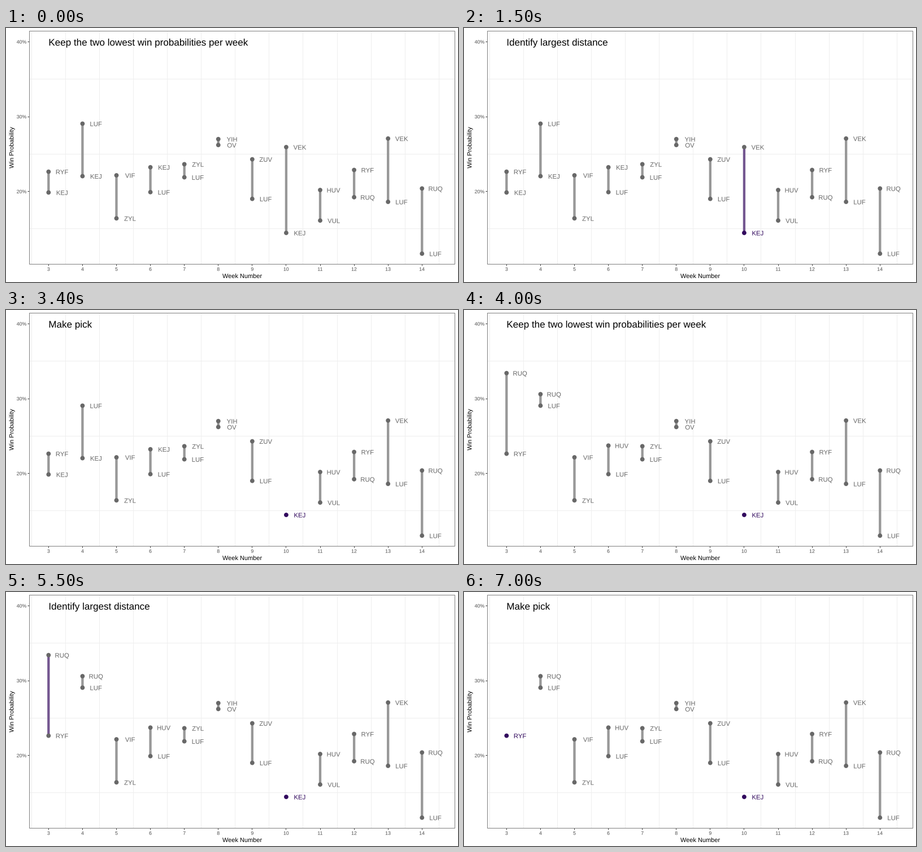
Write a matplotlib script that moves like this. It is 800 px wide and 450 px high and loops after 8000 ms.

```python
import matplotlib.pyplot as plt
from matplotlib.animation import FuncAnimation
from matplotlib.patches import Circle, PathPatch, Rectangle
from matplotlib.textpath import TextPath
from matplotlib.transforms import Affine2D

plt.rcParams["font.family"] = "Liberation Sans"

W, H = 800, 450
PX = 0.72  # points per pixel at 100 dpi
STEP_MS = 500

GREY, BAR_GREY = "#686868", "#989898"
PICK, BAR_PICK = "#320A5E", "#745790"
LEFT, TOP, RIGHT, BOTTOM = 41, 5, 794, 418

KEEP = "Keep the two lowest win probabilities per week"
FIND = "Identify largest distance"
MAKE = "Make pick"

# week: [(team, y), (team, y)], in stage pixels
START = {
    3: [("RYF", 254.6), ("KEJ", 291.4)],
    4: [("LUF", 169.5), ("KEJ", 262.5)],
    5: [("VIF", 261.0), ("ZYL", 337.2)],
    6: [("KEJ", 246.7), ("LUF", 290.8)],
    7: [("ZYL", 241.3), ("LUF", 264.5)],
    8: [("YIH", 196.8), ("OV", 207.3)],
    9: [("ZUV", 232.6), ("LUF", 302.7)],
    10: [("VEK", 211.0), ("KEJ", 363.0)],
    11: [("HUV", 287.0), ("VUL", 341.1)],
    12: [("RYF", 251.5), ("RUQ", 299.8)],
    13: [("VEK", 195.8), ("LUF", 308.0)],
    14: [("RUQ", 284.3), ("LUF", 399.8)],
}
PICKED = {**START, 10: START[10][1:]}
SECOND = {
    **PICKED,
    3: [("RUQ", 111.8), ("RYF", 254.6)],
    4: [("RUQ", 149.1), ("LUF", 169.5)],
    6: [("HUV", 240.2), ("LUF", 290.8)],
}
THIRD = {**SECOND, 3: SECOND[3][1:]}

fig = plt.figure(figsize=(W / 100, H / 100), dpi=100, facecolor="white")
ax = fig.add_axes([0, 0, 1, 1])
ax.set_xlim(0, W)
ax.set_ylim(H, 0)
ax.axis("off")


def week_x(week):
    return 75.3 + 60.09 * (week - 3)


def text(x, y, string, size, color, align=0.5, turn=0):
    """Draw text with its baseline at (x, y); align 0 is left, 1 is right."""
    path = TextPath((0, 0), string, size=size)
    if align:
        box = path.get_extents()
        path = path.transformed(
            Affine2D().translate(-box.x0 - align * box.width, 0))
    place = Affine2D().scale(1, -1).rotate_deg(-turn).translate(x, y)
    return ax.add_patch(PathPatch(path.transformed(place), fc=color, lw=0,
                                  zorder=4))


def line(x0, y0, x1, y1, color, zorder=1):
    """Draw a hairline that fills the pixel row or column it falls in."""
    ax.plot([int(x0), int(x1)], [int(y0), int(y1)], color=color, lw=PX,
            zorder=zorder, solid_capstyle="butt")


def draw_axes():
    for week in range(3, 16):
        x = week_x(week - 0.5)
        line(x, TOP, x, BOTTOM, "#eeeeee")
    for i in range(3):
        y = 24.4 + 132.6 * i
        line(LEFT, y + 66.3, RIGHT, y + 66.3, "#eeeeee")
        line(38, y, LEFT, y, "#333333")
        text(36, y + 3.2, f"{40 - 10 * i}%", 8.8, "#4d4d4d", 1)
    for week in range(3, 15):
        x = week_x(week)
        line(x, BOTTOM, x, 421, "#333333")
        text(x, 430.2, str(week), 8.8, "#4d4d4d")
    ax.add_patch(Rectangle((LEFT, TOP), RIGHT - LEFT, BOTTOM - TOP,
                           fill=False, ec="#7f7f7f", lw=PX, zorder=2))
    text(418, 443, "Week Number", 11, "black")
    text(13.4, 212, "Win Probability", 11, "black", turn=90)


def draw_week(week, teams, picks, bar, pick):
    x = week_x(week)
    artists = []
    if len(teams) == 2:
        (_, top), (_, low) = teams
        artists.append(ax.add_patch(Rectangle(
            (x - 2.15, top), 4.3, low - top, fc=bar, lw=0, snap=False,
            zorder=3)))
    for team, y in teams:
        color = pick if (week, team) in picks else GREY
        artists.append(ax.add_patch(Circle((x, y), 3.9, fc=color, lw=0,
                                           zorder=4)))
        artists.append(text(x + 24, y + 4.4, team, 11.38, color))
    return artists


def draw_scene(title, weeks, picks=(), marked=None, dark=False):
    pick = "black" if dark else PICK
    bar_pick = "#6f6f6f" if dark else BAR_PICK
    artists = [text(75.3, 31.2, title, 17.07, "black", 0)]
    for week, teams in weeks.items():
        bar = bar_pick if week == marked else BAR_GREY
        artists += draw_week(week, teams, picks, bar, pick)
    if dark:
        artists.append(ax.add_patch(Rectangle((0, 0), W, H, fc="black", lw=0,
                                              alpha=0.67, zorder=9)))
    return artists


draw_axes()
FIRST_PICK = [(10, "KEJ")]
BOTH_PICKS = FIRST_PICK + [(3, "RYF")]

# (number of steps, artists)
scenes = [
    (2, draw_scene(KEEP, START)),
    (1, draw_scene(FIND, START, FIRST_PICK, 10, dark=True)),
    (2, draw_scene(FIND, START, FIRST_PICK, 10)),
    (3, draw_scene(MAKE, PICKED, FIRST_PICK)),
    (3, draw_scene(KEEP, SECOND, FIRST_PICK)),
    (3, draw_scene(FIND, SECOND, FIRST_PICK, 3)),
    (2, draw_scene(MAKE, THIRD, BOTH_PICKS)),
]
order = [i for i, (steps, _) in enumerate(scenes) for _ in range(steps)]


def update(frame):
    for i, (_, artists) in enumerate(scenes):
        for artist in artists:
            artist.set_visible(i == order[frame])
    return []


anim = FuncAnimation(fig, update, frames=len(order), interval=STEP_MS,
                     repeat=True, repeat_delay=0, blit=False)
plt.show()
```
